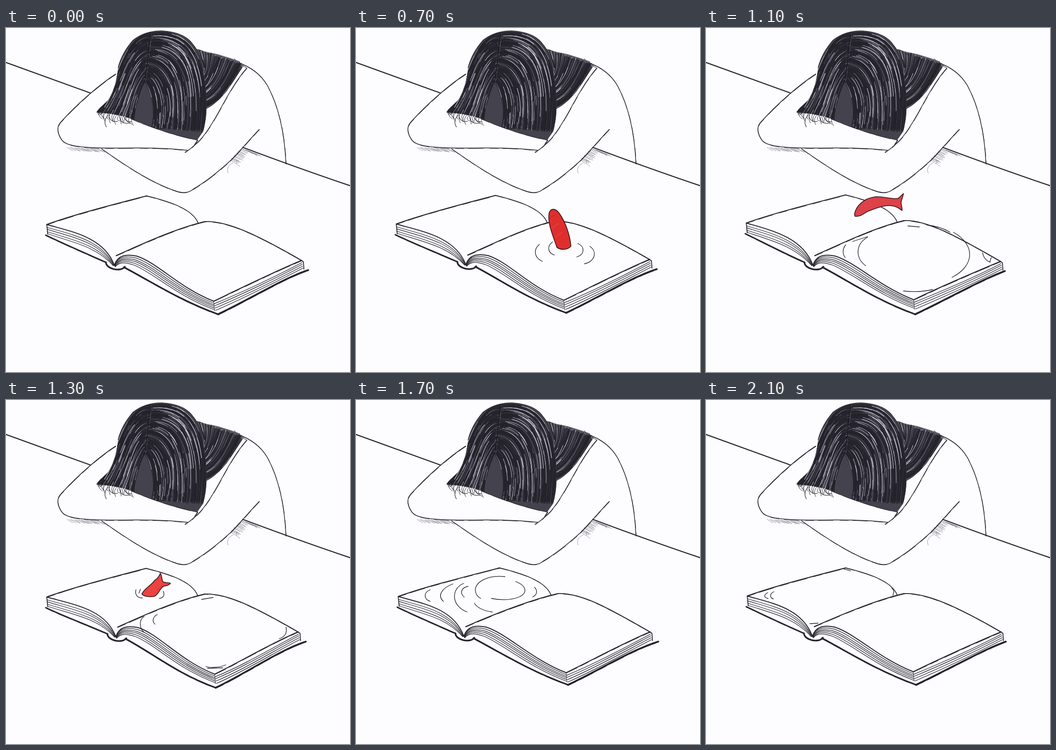
An HTML page with a canvas for the animation above (2.3 s loop, 709 px wide and 709 px high).

```html
<!DOCTYPE html>
<html lang="en">
<head>
<meta charset="utf-8">
<title>Asleep by the book</title>
<style>
html, body { margin: 0; width: 100%; height: 100%; overflow: hidden; background: #fdfdff; }
canvas { display: block; width: 709px; height: 709px; }
</style>
</head>
<body>
<canvas id="stage" width="709" height="709"></canvas>
<script>
const ctx = document.getElementById('stage').getContext('2d');
const INK = '#25242c';
let seed;
const rnd = () => (seed = (seed * 16807) % 2147483647) / 2147483647;
const jit = a => (rnd() - .5) * 2 * a;
const mix = (a, b, k) => a + (b - a) * k;
const mixAll = (a, b, k) => a.map((v, i) => mix(v, b[i], k));

function line(d, width = 1.8, color = INK) {
  ctx.lineWidth = width;
  ctx.strokeStyle = color;
  ctx.stroke(new Path2D(d));
}

// A pen line with a second, broken pass beside it
function pen(d, width = 1.7) {
  line(d, width);
  ctx.save();
  ctx.translate(.5, .8);
  ctx.setLineDash([17, 9, 31, 14]);
  line(d, width * .6);
  ctx.restore();
}

const curve = p => `M${p[0]},${p[1]}C${p.slice(2).join()}`;

// Hair strands between two bounding curves
function strands(n, from, to, color, width, wobble, whole) {
  for (let i = 0; i < n; i++) {
    const p = mixAll(from, to, rnd()).map(v => v + jit(wobble));
    ctx.setLineDash(whole ? [] : [0, rnd() * 150, 18 + rnd() * 55, 400]);
    line(curve(p), width * (.6 + rnd() * .7), color);
  }
  ctx.setLineDash([]);
}

function hatch(n, x, y, dx, dy, len) {
  for (let i = 0; i < n; i++) {
    const k = i / n;
    line(`M${x + dx * k + jit(2)},${y + dy * k}l${len * (.6 + rnd() * .5)},${len * .42}`, .7, '#777783');
  }
}

function clipped(shape, draw) {
  ctx.save();
  ctx.clip(new Path2D(shape));
  draw();
  ctx.restore();
}

const HEAD = 'M394,231C350,222 300,205 258,187C235,178 210,176 186,174C191,164 204,158 213,145C224,125 229,105 231,82C236,62 247,42 262,25C280,11 302,5 325,6C352,8 375,17 387,36C400,52 404,72 406,90C415,130 417,180 406,214Z';
const BACK = 'M393,43L412,49L436,54L462,62L482,69L487,82L470,106L455,130L440,147L424,160L410,167Z';

function hair() {
  const right = [[298, 12, 390, -6, 424, 80, 408, 212], [286, 109, 300, 130, 308, 165, 300, 204]];
  const left = [[298, 12, 240, 15, 236, 112, 188, 174], [286, 109, 275, 130, 265, 160, 262, 190]];
  const nape = [[397, 44, 402, 55, 405, 70, 410, 80], [487, 76, 468, 112, 446, 152, 410, 166]];
  clipped(BACK, () => {
    ctx.fillStyle = '#5c5b66';
    ctx.fillRect(390, 40, 100, 130);
    strands(80, ...nape, '#25242c', 1.4, 2, true);
    strands(35, ...nape, '#d9d8e4', .9, 2);
  });
  strands(16, [460, 66, 450, 90, 430, 120, 412, 135], nape[1], INK, .9, 3, true);
  clipped(HEAD, () => {
    ctx.fillStyle = '#44434d';
    ctx.fillRect(180, 0, 240, 240);
    for (const side of [right, left]) {
      strands(120, ...side, '#24232b', 1.4, 3, true);
      strands(105, ...side, '#c9c8d6', .95, 3);
      strands(45, ...side, '#24232b', 1.1, 3, true);
    }
    line('M298,10C293,40 292,75 286,110', 2, '#1c1b23');
  });
  line('M262,25C280,11 302,5 325,6C352,8 375,17 387,36C400,52 404,72 406,90', 1.2);
  line('M231,82C236,62 247,42 262,25', 1.2);
  for (let i = 0; i < 17; i++) {
    const x = 184 + i * 4.4;
    line(`M${x + 8},${167 + i}q${-10 + jit(4)},${9 + jit(4)} ${-2 + jit(5)},${19 + jit(6)}`, .9);
  }
  line('M190,172c3,8 6,6 9,3M212,178c0,12 9,17 18,14M234,181c0,12 8,17 20,15M244,184c2,7 6,10 14,9M210,180c-7,8 -8,16 -3,24', 1.1);
}

function girl() {
  seed = 77;
  line('M0,71C55,91 115,113 174,134', 2.2);
  line('M488,246C560,273 635,300 709,325', 2.2);
  hatch(16, 128, 246, 66, 3, 17);
  hatch(17, 486, 248, -26, 26, 18);
  hatch(10, 490, 250, 24, 9, 16);
  line('M468,278c-10,5 -14,12 -10,21M476,272c-3,5 -1,9 6,13', .7, '#777783');
  pen('M226,95C194,116 150,153 112,195C103,206 107,220 116,232C125,243 151,245 186,247C240,249 293,244 374,252', 1.5);
  pen('M197,249C234,275 295,318 350,336C364,341 377,340 386,332C415,315 440,294 462,274C483,253 501,231 522,209', 1.5);
  pen('M496,83C474,108 457,139 439,172C424,199 406,228 391,239C384,246 378,252 369,256', 1.4);
  pen('M258,187C300,205 350,222 395,231L389,240', 1.4);
  pen('M478,71C504,80 525,95 539,119C560,158 574,211 577,280', 1.4);
  line('M470,63L482,74L497,83', 1);
  hair();
}

// b: left corner, far corner, right corner, near corner, cover tip, spine
function book(b, sx) {
  const [lx, ly, tx, ty, rx, ry, nx, ny, cx, cy, s, sy] = b;
  const gx = tx + 106, gy = ty + 56;
  pen(`M${lx},${ly}C${lx + 55},${ly - 20} ${tx - 70},${ty + 18} ${tx},${ty}`, 1.9);
  pen(`M${tx},${ty}C${tx + 40},${ty + 10} ${gx - 12},${gy - 31} ${gx},${gy}`, 1.5);
  pen(`M${s + 4},${sy - 28}C${s + 50},${sy - 48} ${gx - 50},${gy + 12} ${gx + 14},${gy - 3}C${gx + 60},${gy - 5} ${rx - 92},${ry - 53} ${rx},${ry}`, 1.9);
  pen(`M${rx},${ry}C${rx - 55},${ry + 23} ${nx + 48},${ny - 23} ${nx},${ny}`, 1.9);

  const top = [lx, ly, lx + 52, ly + 15, s - 22, sy - 66, s, sy - 9];
  const low = [lx + 1, ly + 19, lx + 56, ly + 37, s - 36, sy - 46, s - 2, sy - 7];
  [0, .3, .52, .78, 1].forEach((k, i) => line(curve(mixAll(top, low, k)), i ? 1.1 : 1.9));

  const fore = [s, sy - 8, s + 8, sy - 30, s + 26, sy - 31, s + 46, sy - 27, s + 90, sy - 13, nx - 72, ny - 28, nx, ny];
  const base = [s + 2, sy - 5, s + 12, sy - 16, s + 24, sy - 14, s + 42, sy - 8, s + 84, sy + 10, nx - 78, ny - 12, nx + 2, ny + 18];
  [0, .22, .43, .6, .8, 1].forEach((k, i) => {
    const p = mixAll(fore, base, k);
    line(`M${p.slice(0, 2)}C${p.slice(2, 8)}C${p.slice(8)}`, i ? 1.2 : 1.9);
  });

  [.28, .5, .75, 1].forEach(k => line(
    `M${nx + 4 * k},${ny + 19 * k}C${nx + 58},${ny - 23 + 19 * k} ${rx - 48},${ry + 26 + 16 * k} ${rx + 3 * k},${ry + 16 * k}`, 1.3));
  line(`M${lx},${ly}l2,20M${rx},${ry}l4,3l1,15`, 1.7);
  line(`M${nx},${ny}l2,20`, .8);

  pen(`M${lx - 2},${ly + 22}C${lx + 35},${ly + 40} ${s - 60},${sy - 33} ${s - 17},${sy - 14}`, 3);
  line(`M${s - 17},${sy - 14}C${s - 17},${sy - 1} ${s + 12},${sy + 7} ${s + 22},${sy - 5}`, 3.4);
  pen(`M${s + 20},${sy - 4}C${s + 75},${sy + 25} ${cx - 80},${cy - 29} ${cx},${cy}`, 3.2);
  pen(`M${cx},${cy}C${cx + 60},${cy - 28} ${rx - 36},${ry + 36} ${rx + sx},${ry + 20}`, 3.6);
}

function fish(d, color) {
  const body = new Path2D(d);
  ctx.fillStyle = color;
  ctx.fill(body);
  clipped(d, () => {
    seed = 9;
    for (let i = 0; i < 28; i++) {
      line(`M${270 + i * 7},${340 + rnd() * 120}l14,-9`, 1.6, i % 3 ? 'rgba(255,130,125,.25)' : 'rgba(130,0,10,.25)');
    }
  });
  line(d, 1.6, '#38171c');
}

// book corners, reach of the right cover, water lines, fish outline, fish colour
const scenes = [
  { b: [84, 405, 290, 346, 609, 479, 428, 563, 437, 590, 223, 497], sx: 14 },
  { b: [82, 403, 286, 344, 604, 475, 428, 560, 432, 586, 226, 494], sx: 15,
    water: 'M412,449C407,452 407,459 413,462M461,452C469,456 469,466 456,468',
    fish: 'M419,459C418,450 423,442 430,439C437,441 443,449 441,457C437,463 424,465 419,459Z', red: '#ee4646' },
  { b: [83, 404, 288, 345, 605, 477, 428, 561, 433, 587, 226, 496], sx: 15,
    water: 'M405,441C394,449 394,463 409,468M457,444C473,451 471,467 455,472M378,446C365,457 367,473 384,481M482,450C499,462 491,482 471,486',
    fish: 'M414,452C406,428 394,402 398,381C402,370 412,372 419,382C432,400 441,427 443,450C435,458 422,458 414,452Z', red: '#df2f2d' },
  { b: [82, 404, 288, 346, 605, 478, 428, 562, 433, 588, 226, 497], sx: 14,
    water: 'M398,436C399,447 407,448 402,438C403,432 410,436 412,443C419,439 404,430 412,425M421,433C420,424 430,423 428,430C426,438 430,440 434,437M442,437C438,428 453,428 449,436C444,444 448,448 453,444M421,450l3,6M428,453l2,5M435,460l3,3M339,453C326,462 328,482 351,490M381,449C375,458 382,473 400,471M501,449C519,464 504,497 467,497M552,458C556,470 551,484 538,493M403,524C408,532 420,534 431,533',
    fish: 'M344,366C352,350 368,344 387,345C410,347 425,359 435,370C440,367 445,366 450,363C448,369 443,374 440,377C437,383 437,389 434,394C432,388 427,382 424,378C413,370 398,370 386,367C371,371 355,374 344,370Z', red: '#e02826' },
  { b: [83, 402, 288, 344, 607, 481, 428, 560, 431, 590, 220, 497], sx: 9,
    water: 'M333,431C306,447 309,475 329,490M288,447C281,455 281,466 287,473M302,440l31,-10M416,408l24,2M455,406C476,408 490,413 503,421M510,421C556,447 554,490 507,514M570,463C572,474 578,480 586,483M588,473l-3,9M407,542C430,545 450,543 467,539',
    fish: 'M306,384C309,366 326,351 348,348C364,346 383,354 396,351C400,348 403,345 407,341C406,348 403,354 402,359C402,365 405,371 404,376C399,373 394,368 386,367C369,363 349,372 333,378C324,383 319,389 307,388Z', red: '#dd4149' },
  { b: [84, 406, 289, 347, 602, 478, 430, 565, 432, 593, 226, 496], sx: 16,
    water: 'M285,446C274,452 274,470 285,479M312,442C302,447 301,457 307,462M403,411l24,-4M577,468C580,480 575,488 563,492M412,549C420,553 440,551 453,546M415,553L447,552M268,391C265,400 270,408 281,408M277,390l-3,8M324,394C328,402 324,408 316,409',
    fish: 'M280,400C285,388 300,382 306,372C313,368 316,362 318,357C322,362 320,370 324,375C330,378 336,375 339,378C334,384 327,382 323,385C315,392 314,402 305,405C295,406 284,405 280,400Z', red: '#ec4240' },
  { b: [86, 405, 292, 346, 604, 478, 431, 563, 435, 590, 224, 496], sx: 16,
    water: 'M281,382C263,389 260,402 276,409M322,382C342,389 341,402 324,409M255,377C232,389 231,409 253,419M347,378C363,386 363,397 350,405M286,398C284,389 292,388 292,396M299,394C298,385 307,385 306,395M312,397C313,389 321,391 317,399' },
  { b: [87, 405, 296, 346, 606, 478, 433, 562, 437, 587, 222, 495], sx: 17,
    water: 'M307,364C270,360 245,376 246,393C247,401 251,406 257,409M329,374C352,383 354,398 336,406C319,413 301,413 279,409M368,386C375,393 373,402 364,406M222,378C196,388 195,424 229,437M231,384C219,386 212,397 223,406M200,379C175,388 168,404 180,415M153,391C139,397 139,410 153,415M244,419C250,428 260,434 281,437' },
  { b: [86, 404, 292, 346, 607, 478, 430, 561, 435, 587, 220, 496], sx: 13,
    water: 'M184,382C158,394 157,415 187,426M147,391C132,397 131,408 144,413M245,362C276,354 316,356 339,366M365,376C378,386 379,396 370,405M216,443C227,449 239,450 252,447' },
  { b: [85, 404, 288, 346, 608, 478, 427, 560, 433, 587, 219, 495], sx: 10,
    water: 'M127,397C118,402 120,408 128,409M140,395C130,400 132,408 139,410M284,348l14,4M383,388c6,5 4,10 2,15M214,461l17,-1' },
];

function draw({ b, sx, water, fish: body, red }) {
  ctx.fillStyle = '#fdfdff';
  ctx.fillRect(0, 0, 709, 709);
  ctx.lineCap = ctx.lineJoin = 'round';
  girl();
  book(b, sx);
  if (water) line(water, 1.3);
  if (body) fish(body, red);
}

let shown = -1;
function tick() {
  const t = performance.now() % 2300;
  const now = t < 500 ? 0 : 1 + Math.floor((t - 500) / 200);
  if (now !== shown) draw(scenes[shown = now]);
  requestAnimationFrame(tick);
}
tick();
</script>
</body>
</html>
```
